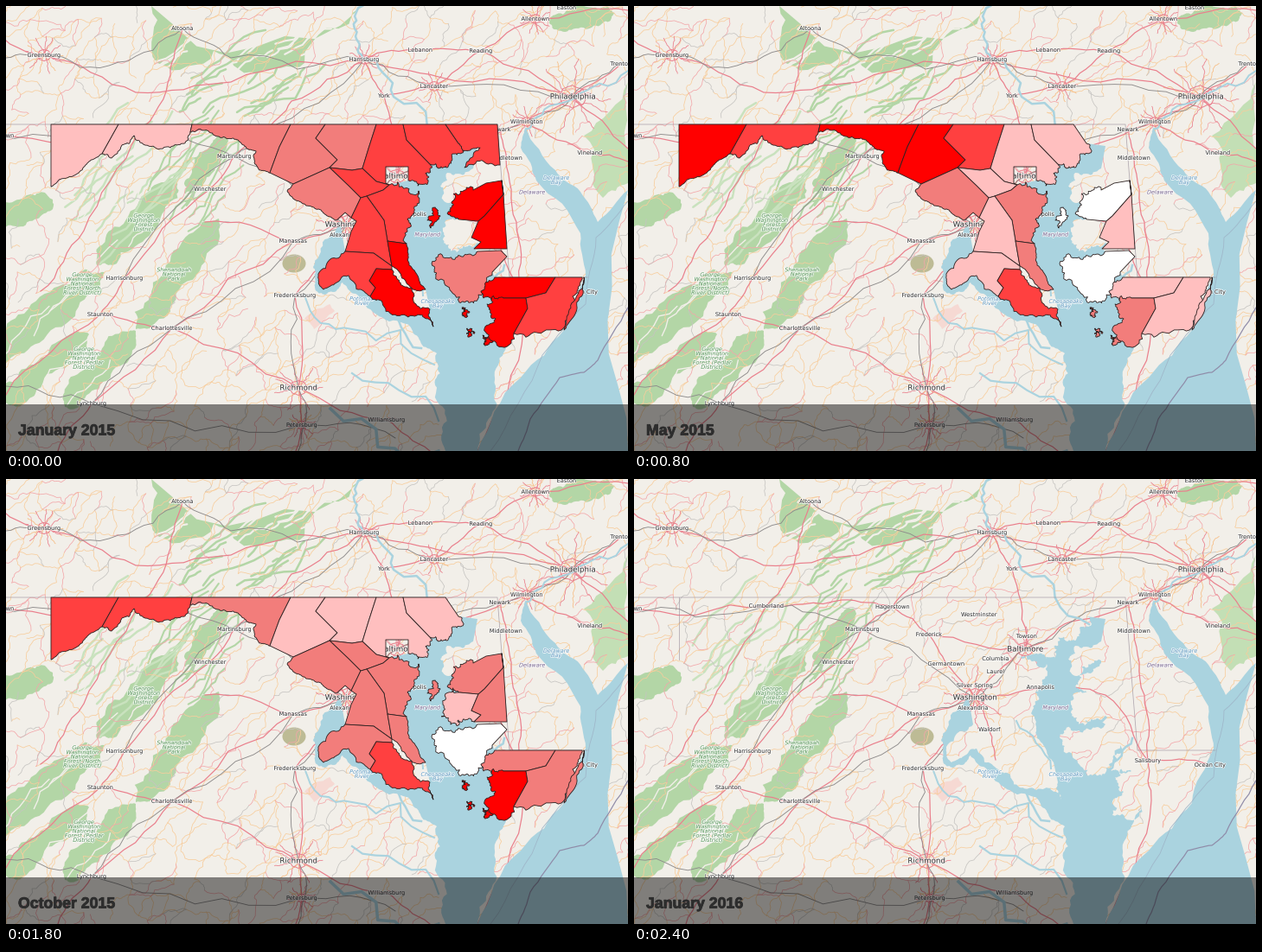
A matplotlib script for the animation above (2.6 s loop, 719 px wide and 515 px high).

```python
import numpy as np
import matplotlib.pyplot as plt
from matplotlib.animation import FuncAnimation
from matplotlib.collections import LineCollection
from matplotlib.patches import Ellipse, Polygon, Rectangle
from matplotlib.patheffects import withStroke

W, H, PX = 719, 515, 0.72
LAND, WATER, FOREST = "#f2efe9", "#aad3df", "#b3d6a6"
ORANGE, RED, GREY = "#f7bd84", "#ea7f8c", "#8d8a8a"
SHADES = ["#ffffff", "#ffbfbf", "#f27d7b", "#ff4040", "#ff0000"]
MONTHS = ["January", "February", "March", "April", "May", "June", "July",
          "August", "September", "October", "November", "December"]

fig = plt.figure(figsize=(W / 100, H / 100), dpi=100, facecolor=LAND)
ax = fig.add_axes([0, 0, 1, 1])
ax.set(xlim=(0, W), ylim=(H, 0))
ax.axis("off")
rng = np.random.default_rng(5)


def path(*flat):
    return np.reshape(flat, (-1, 2)).astype(float)


def rough(p, amp=0.12, depth=3):
    """Turn a coarse path into a wiggly one by midpoint displacement."""
    noise = np.random.default_rng(int(abs(p).sum()))
    for _ in range(depth):
        d = np.diff(p, axis=0)
        shift = amp * noise.uniform(-1, 1, (len(d), 1))
        finer = np.empty((2 * len(p) - 1, 2))
        finer[::2] = p
        finer[1::2] = (p[:-1] + p[1:]) / 2 + d[:, ::-1] * [-1, 1] * shift
        p = finer
    return p


def shore(*flat, amp=0.36):
    return rough(path(*flat), amp, 4)


def area(color, p, amp=0.2, z=1):
    ax.add_patch(Polygon(rough(np.vstack([p, p[:1]]), amp), fc=color, lw=0,
                         zorder=z))


def line(color, width, p, amp=0.08, z=3):
    ax.plot(*rough(p, amp).T, color=color, lw=width * PX, zorder=z)


def strokes(paths, color, width, z):
    ax.add_collection(LineCollection(paths, colors=color, linewidths=width,
                                     zorder=z, capstyle="round"))


# Forests
def strip(x0, y0, x1, y1, width):
    """A lens of forest along a mountain ridge."""
    t = np.linspace(0, np.pi, 6)
    along = np.array([x1 - x0, y1 - y0])
    across = along[::-1] * [-1, 1] / np.hypot(*along) * width / 2
    mid = np.array([x0, y0]) + np.outer((1 - np.cos(t)) / 2, along)
    bulge = np.outer(np.sqrt(np.sin(t).clip(0)), across)
    area(FOREST, np.vstack([mid + bulge, (mid - bulge)[-2:0:-1]]))


area(FOREST, path(168, 0, 412, 0, 345, 66, 290, 78, 240, 52, 175, 66))
area("#c3dfb5", path(719, 88, 719, 205, 690, 222, 668, 150))
strip(105, 300, 198, 204, 34)
strip(-20, 408, 114, 308, 42)
strip(-10, 460, 96, 380, 30)
strip(150, 374, 246, 246, 34)
strip(68, 464, 150, 376, 30)
strip(-20, 250, 54, 224, 30)
strip(208, 215, 254, 150, 20)
strip(628, 20, 704, 8, 22)


def ridges(count, xs, ys, slope, color, width):
    x, y = rng.uniform(*xs, count), rng.uniform(*ys, count)
    n = rng.uniform(12, 45, count)
    strokes([rough(path(a - l, b + l * slope, a + l, b - l * slope), 0.15)
             for a, b, l in zip(x, y, n)], color, width, 1)


ridges(20, (180, 390), (5, 70), 0.55, LAND, 1.6)
ridges(12, (195, 360), (45, 115), 0.65, FOREST, 1.8)
ridges(14, (195, 250), (155, 240), 1.2, FOREST, 1.5)
ridges(14, (60, 190), (150, 270), 1.1, "#c9e2be", 1.8)
ridges(16, (15, 180), (220, 440), 1.05, LAND, 1)
ax.add_patch(Ellipse((333, 298), 27, 21, fc="#bdbb95", lw=0, zorder=1))
area("#f6d9d3", path(345, 362, 374, 345, 380, 353, 356, 374), 0.1)

# Minor road net on a jittered grid
nodes = {(i, j): (i * 21 + rng.uniform(-8, 8), j * 21 + rng.uniform(-8, 8))
         for i in range(36) for j in range(26)}
net = {"#f8cd9c": [], "#f3a6a9": [], "#c6c4c1": []}
for (i, j), start in nodes.items():
    for end in (nodes.get((i + 1, j)), nodes.get((i, j + 1)),
                nodes.get((i + 1, j - 1))):
        if end and rng.random() < 0.5:
            color = rng.choice(list(net), p=[0.6, 0.3, 0.1])
            net[color].append(rough(path(*start, *end), 0.22))
for color, paths in net.items():
    strokes(paths, color, 0.55, 2)

TOWNS = {
    "Altoona": (204, 26), "Greensburg": (44, 57), "Harrisburg": (414, 62),
    "Lebanon": (479, 51), "Reading": (549, 52), "Lancaster": (495, 93),
    "Allentown": (612, 15), "York": (437, 104), "Wilmington": (602, 134),
    "Newark": (571, 143), "Trenton": (711, 67), "Vineland": (675, 170),
    "Middletown": (578, 176), "Easton": (648, 2), "Morgantown": (-11, 150),
    "Cumberland": (153, 147), "Hagerstown": (299, 148),
    "Martinsburg": (264, 174), "Winchester": (236, 212),
    "Frederick": (341, 180), "Westminster": (399, 157),
    "Germantown": (361, 214), "Columbia": (418, 208), "Towson": (454, 182),
    "Laurel": (418, 223), "Silver Spring": (394, 239),
    "Annapolis": (470, 241), "Alexandria": (392, 265),
    "Manassas": (332, 272), "Waldorf": (411, 290),
    "Fredericksburg": (334, 335), "Harrisonburg": (137, 315),
    "Staunton": (109, 357), "Charlottesville": (192, 373),
    "Lynchburg": (99, 460), "Petersburg": (342, 485),
    "Williamsburg": (440, 479), "Salisbury": (594, 326),
    "Ocean City": (666, 331), "Philadelphia": (655, 105),
    "Baltimore": (452, 197), "Washington": (394, 253),
    "Richmond": (338, 442),
}
LARGE = ("Philadelphia", "Baltimore", "Washington", "Richmond")

# Streets fanning out of the bigger towns
for town, r in {"Washington": 36, "Baltimore": 26, "Philadelphia": 44,
                "Richmond": 28, "Harrisburg": 18, "Petersburg": 16,
                "Wilmington": 18, "Lancaster": 18, "Allentown": 18,
                "Greensburg": 22}.items():
    x, y = TOWNS[town]
    for k in range(13):
        c, s = np.cos(2.4 * k + x), np.sin(2.4 * k + x)
        line((ORANGE, RED, RED)[k % 3], 0.8,
             path(x, y, x + c * r * 0.6, y + s * r * 0.6, x + c * r, y + s * r),
             0.2)
    a = np.linspace(0, 2 * np.pi, 9)
    line(RED, 1, np.c_[x + r * 0.36 * np.cos(a), y + r * 0.3 * np.sin(a)])


def route(*stops, color=RED, width=1.2, amp=0.08):
    line(color, width, path(*[TOWNS.get(s, s) for s in stops]), amp)


route("Harrisburg", (330, 110), "Hagerstown", "Martinsburg", "Winchester",
      "Harrisonburg", "Staunton", (0, 450))
route((335, 515), "Petersburg", "Richmond", "Fredericksburg", "Alexandria",
      "Washington", "Baltimore", (505, 165), "Wilmington", "Philadelphia",
      "Trenton")
route("Staunton", "Charlottesville", "Richmond", "Williamsburg", (490, 515))
route("Harrisburg", "York", "Towson", "Baltimore")
route("Cumberland", (240, 140), "Hagerstown", "Frederick", "Baltimore")
route("Frederick", "Germantown", "Washington")
route("Morgantown", "Cumberland")
route((0, 40), "Greensburg", (150, 100), (260, 88), "Harrisburg", (500, 82),
      "Philadelphia")
route("Washington", "Manassas", (230, 250))
route("Harrisburg", "Lebanon", "Reading", "Allentown", (719, 5))
route("Charlottesville", "Manassas")
route("Charlottesville", "Lynchburg", (60, 515))
route("Newark", "Middletown", (590, 250), "Salisbury", (598, 372), (545, 515))
route("Washington", "Annapolis", (545, 250), "Salisbury", "Ocean City")
route("Washington", "Waldorf", (418, 325))
route("Wilmington", "Vineland", (719, 180))
route("Philadelphia", (719, 165))
route("Altoona", (190, 80), "Cumberland", (90, 260), (40, 330))
route("York", "Lancaster", "Reading", "Philadelphia")
for rail in (
    ((0, 60), "Greensburg", (130, 65), "Altoona", (260, 60), "Harrisburg",
     "Lancaster", "Philadelphia", "Trenton"),
    ("Morgantown", "Cumberland", "Martinsburg", "Washington", "Baltimore",
     "Newark", "Philadelphia"),
    ((338, 515), "Richmond", "Fredericksburg", "Washington"),
    ("Lynchburg", "Charlottesville", "Manassas", "Washington"),
    ((0, 440), "Lynchburg", "Petersburg", (450, 500)),
    ("Harrisburg", "Hagerstown", "Martinsburg", "Harrisonburg"),
):
    route(*rail, color=GREY, width=0.9, amp=0.12)

# Borders and shores, each shared by the areas on both sides
garrett_allegany = path(130, 137, 111, 171)
allegany_washington = path(215, 137, 213, 146)
washington_frederick = path(329, 137, 316, 163, 305, 193)
frederick_carroll = path(369, 137, 358, 153, 383, 178, 374, 187)
frederick_montgomery = path(374, 187, 332, 206)
carroll_baltimore = path(428, 137, 419, 165, 412, 188)
carroll_howard = path(374, 187, 400, 190, 412, 188)
howard_baltimore = path(412, 188, 428, 203, 443, 207)
howard_montgomery = path(374, 187, 396, 208, 410, 222)
howard_arundel = path(443, 207, 436, 213, 417, 220)
baltimore_harford = path(459, 137, 463, 155, 490, 183)
harford_cecil = path(508, 137, 523, 159)
montgomery_george = path(399, 245, 410, 222)
george_arundel = path(417, 220, 437, 248, 441, 272)
george_calvert = path(441, 272, 446, 301)
george_charles = path(446, 301, 425, 286, 392, 284)
arundel_calvert = path(441, 272, 463, 275)
charles_mary = path(446, 305, 428, 304, 420, 318, 427, 326, 421, 336)
kent_anne = path(573, 202, 555, 205, 540, 213)
anne_caroline = path(573, 202, 575, 218, 553, 243, 546, 249)
anne_talbot = path(546, 249, 524, 247)
talbot_caroline = path(546, 249, 538, 268, 549, 273, 541, 281)
wicomico_worcester = path(635, 314, 624, 332, 601, 338)
wicomico_somerset = path(601, 338, 575, 338)
somerset_worcester = path(601, 338, 603, 350, 587, 379)

garrett_bank = shore(111, 171, 92, 184, 70, 199, 52, 209, amp=0.12)
allegany_bank = shore(213, 146, 211, 154, 190, 164, 155, 158, 148, 150,
                      133, 163, 122, 176, 111, 171, amp=0.2)
washington_bank = shore(305, 193, 293, 190, 289, 168, 275, 161, 262, 153,
                        235, 146, 213, 146, amp=0.2)
montgomery_bank = shore(332, 206, 325, 214, 342, 228, 364, 236, 382, 248,
                        amp=0.12)
harford_shore = shore(523, 159, 527, 170, 512, 184, 500, 188, 490, 183)
baltimore_shore = shore(490, 183, 485, 194, 488, 203, 476, 208, 465, 202)
arundel_shore = shore(463, 275, 468, 253, 464, 247, 478, 227, 477, 214,
                      443, 207)
calvert_shore = shore(463, 275, 466, 300, 485, 328, 470, 328, 446, 301,
                      amp=0.14)
mary_shore = shore(446, 305, 463, 325, 490, 351, 494, 371, 475, 358,
                   437, 348, 421, 336, amp=0.25)
charles_shore = shore(421, 336, 396, 312, 388, 314, 367, 328, 361, 310,
                      392, 284, amp=0.15)
cecil_shore = shore(571, 184, 530, 187, 548, 164, 528, 168, 523, 159, amp=0.2)
kent_shore = shore(540, 213, 515, 227, 502, 208, 510, 193, 540, 188, amp=0.3)
anne_shore = shore(540, 213, 516, 226, 510, 240, 524, 247)
talbot_shore = shore(541, 281, 523, 279, 514, 284, 505, 261, 524, 247,
                     amp=0.45)
dorchester_shore = shore(562, 308, 545, 340, 524, 343, 497, 312, 492, 298,
                         520, 291, 545, 284)
wicomico_shore = shore(575, 338, 552, 338, 565, 314, amp=0.3)
somerset_shore = shore(587, 379, 553, 389, 566, 362, 556, 345, 575, 338)
worcester_shore = shore(666, 314, 655, 336, 642, 375, 587, 379, amp=0.2)

# Water
virginia_shore = shore(386, 250, 355, 302, 357, 326, 368, 334, 389, 320,
                       412, 343, 470, 376, 498, 402, 497, 448, 508, 515, amp=0.2)
cape_shore = shore(545, 515, 566, 440, 587, 379, amp=0.15)
bay = np.vstack([
    harford_shore, baltimore_shore, arundel_shore[::-1], calvert_shore[:33],
    mary_shore[32:], charles_shore, virginia_shore, cape_shore,
    somerset_shore, wicomico_shore, dorchester_shore, talbot_shore,
    anne_shore[::-1], kent_shore, path(545, 162)])
ax.add_patch(Polygon(bay, fc=WATER, lw=0, zorder=4))
area(WATER, path(600, 140, 635, 190, 664, 215, 684, 250, 719, 213, 719, 515,
                 545, 515, 595, 430, 645, 375, 670, 312, 664, 263, 613, 202,
                 595, 164), 0.08, 4)
for width, river in (
    (2.5, path(412, 0, 404, 35, 412, 60, 448, 105, 526, 168)),
    (2, path(345, 335, 400, 374, 495, 415)),
    (2.2, path(400, 425, 500, 480)),
    (3.5, path(375, 466, 500, 515)),
    (2, path(442, 280, 482, 335)),
    (3, path(508, 288, 545, 276)),
    (2.5, path(548, 338, 576, 300)),
    (2.5, path(430, 352, 480, 396)),
    (2, path(600, 145, 608, 134, 655, 108, 719, 75)),
):
    line(WATER, width, river, 0.25, 4)

# Boundaries
for edge in (path(0, 137, 568, 137, 573, 202, 582, 314, 672, 314),
             path(52, 137, 52, 209)):
    ax.plot(*edge.T, color="#9a8f9b", lw=0.6, alpha=0.7, zorder=5)
line("#8f8ba8", 1.2, path(719, 349, 684, 410, 668, 424, 640, 430, 606, 478,
                          592, 515), 0.04, 5)
line("#9fb6c9", 0.8, path(719, 226, 682, 268, 670, 345, 620, 404, 560, 515),
     0.04, 5)

HALO = [withStroke(linewidth=1.2, foreground=(1, 1, 1, 0.75))]


def label(x, y, text, size=6.6, color="#3d3d3d", **style):
    ax.text(x, y, text, fontsize=size * PX, color=color, ha="center",
            va="center", family="DejaVu Sans", path_effects=HALO, zorder=6,
            clip_on=True, linespacing=1.05, **style)


for town, (x, y) in TOWNS.items():
    label(x, y, town, 8.7 if town in LARGE else 6.6)
for color, x, y, text in (
    ("#84739a", 608, 216, "Delaware"),
    ("#84739a", 487, 265, "Maryland"),
    ("#6a9fc4", 411, 342, "Potomac\nRiver"),
    ("#6a9fc4", 499, 345, "Chesapeake\nBay"),
    ("#6a9fc4", 636, 202, "Delaware\nBay"),
    ("#5f9a62", 159, 251, "George\nWashington\nForest\nDistrict"),
    ("#5f9a62", 88, 322,
     "George\nWashington\nNational\nForest (North\nRiver District)"),
    ("#5f9a62", 90, 408,
     "George\nWashington\nNational\nForest (Pedlar\nDistrict)"),
    ("#5f9a62", 194, 311, "Shenandoah\nNational\nPark"),
):
    label(x, y, text, 6.4, color, style="italic")

counties = []


def county(levels, *parts):
    """One shade level per second month, '-' where nothing is drawn."""
    patch = Polygon(np.vstack(parts), ec="#2b2020", lw=0.85 * PX,
                    joinstyle="round", zorder=8)
    ax.add_patch(patch)
    counties.append((patch, [None if c == "-" else int(c) for c in levels]))


county("144341", garrett_allegany, garrett_bank, path(52, 137))
county("123341", garrett_allegany[:1], allegany_washington, allegany_bank)
county("234421", allegany_washington[:1], washington_frederick,
       washington_bank)
county("234411", washington_frederick[::-1], frederick_carroll,
       frederick_montgomery)
county("233110", frederick_carroll[::-1], carroll_baltimore,
       carroll_howard[::-1])
county("331011", carroll_baltimore[::-1], baltimore_harford, baltimore_shore,
       path(465, 186, 439, 186, 439, 205), howard_baltimore[::-1])
county("331001", baltimore_harford[::-1], harford_cecil, harford_shore)
county("3-----", harford_cecil[:1], path(568, 137), cecil_shore)
county("331222", carroll_howard, howard_baltimore, howard_arundel,
       howard_montgomery[::-1])
county("232222", frederick_montgomery, montgomery_bank, path(392, 239),
       montgomery_george, howard_montgomery[::-1])
county("322122", howard_arundel, george_arundel, arundel_calvert,
       arundel_shore)
county("341221", montgomery_george, george_arundel, george_calvert,
       george_charles, path(399, 261, 405, 249))
county("442331", arundel_calvert, calvert_shore)
county("341221", george_charles[::-1], charles_mary, charles_shore)
county("443442", charles_mary, mary_shore[::-1])
county("---0--", path(572, 184), kent_anne, kent_shore)
county("440312", anne_caroline, anne_talbot, anne_shore[::-1],
       kent_anne[::-1])
county("440312", shore(494, 233, 502, 243, 491, 257, 487, 248, 494, 233))
county("---101", talbot_caroline, talbot_shore)
county("431212", anne_caroline, talbot_caroline, path(556, 281, 579, 281),
       anne_caroline[1:2])
county("210000", path(572, 283, 579, 290), dorchester_shore)
county("421413", wicomico_worcester, wicomico_somerset, wicomico_shore)
county("422334", wicomico_somerset[::-1], somerset_worcester, somerset_shore)
for x, y in ((537, 378), (531, 354), (555, 386)):
    county("422334", shore(x - 4, y - 5, x + 5, y, x - 3, y + 5, x - 4, y - 5,
                           amp=0.5))
county("311313", wicomico_worcester[::-1], worcester_shore,
       somerset_worcester[::-1])
county("311313", shore(668, 314, 667, 333, 645, 375, 660, 335, 668, 314,
                       amp=0.15))

# Caption band
ax.add_patch(Rectangle((0, 461), W, H - 461, fc="black", alpha=0.47, lw=0,
                       zorder=10))
INK = "#2d2d2d"
caption = ax.text(14, 496.5, "", fontsize=17.7 * PX, color=INK, weight="bold",
                  family="Liberation Sans", zorder=11,
                  path_effects=[withStroke(linewidth=0.6, foreground=INK)])


def level_at(levels, month):
    if month >= 12:
        return None
    i = month // 2
    now, after = levels[i], levels[min(i + 1, 5)]
    if month % 2 == 0 or after is None:
        return now
    return after if now is None else (now + after + 1) // 2


def draw(month):
    for patch, levels in counties:
        level = level_at(levels, month)
        patch.set_visible(level is not None)
        if level is not None:
            patch.set_facecolor(SHADES[level])
    caption.set_text(f"{MONTHS[month % 12]} {2015 + month // 12}")
    return [caption, *(patch for patch, _ in counties)]


anim = FuncAnimation(fig, draw, frames=13, interval=200, repeat=True)
plt.show()
```
